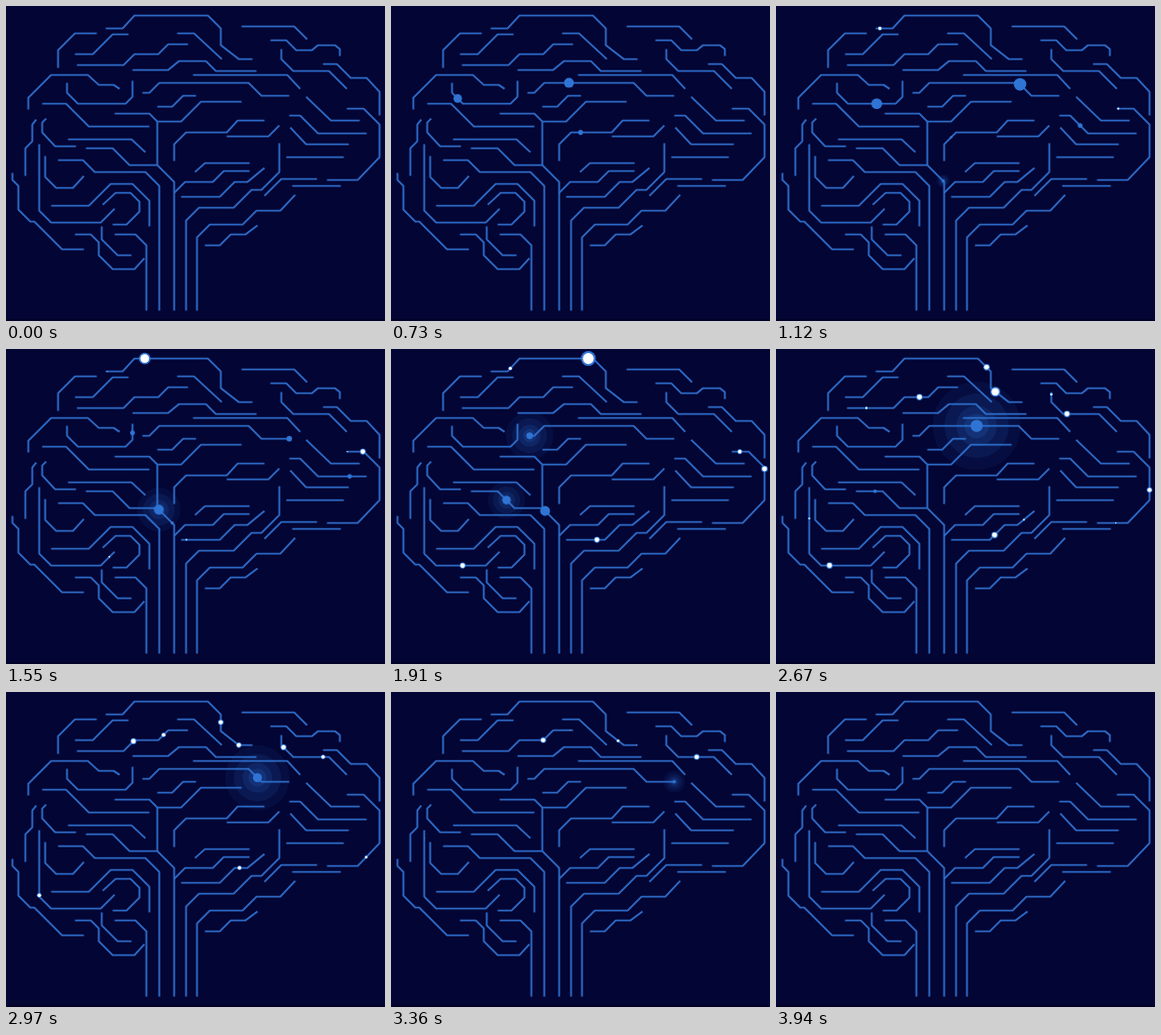
Write an HTML page that moves like this. It is 382 by 318 pixels and loops after 4 s.

```html
<!DOCTYPE html>
<html lang="en">
<head>
<meta charset="utf-8">
<title>Circuit brain</title>
<style>
html, body { margin: 0; width: 100%; height: 100%; overflow: hidden; background: #030534; }
svg { display: block; }
path { fill: none; stroke: #2d69c4; stroke-width: 1.9; stroke-linejoin: round; }
</style>
</head>
<body>
<svg width="382" height="318" viewBox="0 0 382 318">
<rect width="382" height="318" fill="#030534"/>
<rect y="316" width="382" height="2" fill="#010226"/>
<g id="stage" transform="translate(.5 .6)">

<!-- crown -->
<path d="M52 62V44L69 27H91"/>
<path id="crown" d="M100 22H117L129 9H203L216 22V39L234 53H248"/>
<path d="M69 48H87L107 28H123"/>
<path d="M172 27H189L217 53"/>
<path id="brow" d="M71 59H118L129 48H153L163 38H183"/>
<path d="M127 64H163L174 55H201L211 65H252"/>
<path d="M237 20H290L303 33"/>
<path d="M266 34H282L292 44H308L314 39H331L336 43V50"/>
<path id="hook" d="M277 43V53L289 65H325L343 83"/>
<path d="M319 58H333L347 72H363L376 86V110"/>

<!-- back -->
<path id="back" d="M343 103H360L376 119V152L354 175H323"/>
<path d="M302 91L327 115H356"/>
<path id="step" d="M285 110H296L314 128H363"/>
<path d="M286 122L302 139H345"/>
<path d="M282 152H340"/>
<path d="M260 191L277 174H313"/>
<path d="M288 181H337"/>

<!-- middle -->
<path d="M22 104V92L45 69H82L93 79H108L114 83"/>
<path id="cup" d="M61 77V87L72 98H120L127 91V75"/>
<path id="main" d="M137 87H144L154 77H244L257 90H285"/>
<path d="M188 69H283L296 83"/>
<path d="M36 98H60L83 121H144"/>
<path d="M152 101H167L178 90H191"/>
<path d="M109 108H144L152 116V160"/>
<path d="M152 116H176L196 96H237"/>
<path id="inner" d="M169 156V139L181 127H222L233 115H260"/>
<path d="M222 131H264L275 120"/>
<path d="M62 134H126L140 147"/>

<!-- front -->
<path d="M30 114L26 119V136L19 143V171"/>
<path d="M40 113L36 117V127L49 141H70"/>
<path d="M39 151V172L50 183H67L78 171"/>
<path id="front" d="M109 204L95 218H45L33 206V139"/>
<path d="M6 168V175L12 181V205L24 217H28L56 245H78"/>
<path d="M45 201H83L105 179H127L144 196V222"/>
<path d="M97 200L110 188H125L134 197V207L121 220H107"/>
<path d="M69 230H85L93 238V251L107 265H129L139 254"/>
<path d="M96 222V235L112 251H126"/>

<!-- stem -->
<path d="M109 230H130L141 241V307"/>
<path d="M52 155H77L89 167H140L154 181V307"/>
<path id="stem" d="M169 307V177L152 160H124L107 143H80"/>
<path d="M181 307V216L194 203H229L247 185H257L275 167V138"/>
<path d="M192 307V233L205 220H238L252 206H276L291 190"/>
<path d="M200 241H215L226 230H241L253 221"/>
<path d="M169 188L180 177H208L219 166H245"/>
<path d="M190 167L200 158H245"/>
<path id="leaf" d="M176 192H215L230 177H243L260 163"/>
</g>
</svg>
<script>
const LOOP = 4000, BEAT = 530, BLUE = '#2f74d4';
const stage = document.getElementById('stage');
const dots = [];

function circle(parent, r, fill, opacity = 1) {
  const el = document.createElementNS('http://www.w3.org/2000/svg', 'circle');
  for (const [key, value] of Object.entries({ r, fill, opacity })) el.setAttribute(key, value);
  parent.append(el);
}

// A dot runs along a path; stops are its distances on successive beats
function addDot(id, begin, stops, size, { white, halo } = {}) {
  const el = document.createElementNS('http://www.w3.org/2000/svg', 'g');
  stage.append(el);
  if (halo) [1, .73, .46, .28].forEach((s, i) => circle(el, halo * s, BLUE, .08 + i * .03));
  circle(el, white ? 1.36 : 1, BLUE);
  if (white) circle(el, 1, '#fff');
  dots.push({ el, path: document.getElementById(id), begin, stops, size });
}

// Two white sparks, the second one beat behind
function addSparks(id, begin, stops, size = 2.5) {
  addDot(id, begin, stops, size, { white: true });
  addDot(id, begin + BEAT, stops, 2.5, { white: true });
}

addDot('main', 320, [3, 64, 153, 157], 6.5);
addDot('main', 1550, [2, 8, 60, 147, 157], 6.5, { halo: 7.2 });
addDot('cup', 320, [0, 27, 80, 100], 5.6);
addDot('inner', 320, [85, 33, 28], 2.6);
addDot('step', 850, [4, 55, 85], 3.2);
addDot('stem', 950, [130, 146, 203, 233], 5, { halo: 4.5 });
addDot('stem', 1380, [130, 150, 191, 233], 5.4);

addSparks('crown', 850, [0, 21, 104, 135, 167, 181], 5.6);
addSparks('back', 850, [0, 8, 41, 92, 136]);
addSparks('front', 1380, [0, 43, 88, 154]);
addSparks('leaf', 1380, [0, 31, 65, 95]);
addSparks('brow', 1910, [0, 61, 94, 121]);
addSparks('hook', 1910, [0, 13, 57, 88]);

// Smooth curve through the stops, at rest at both ends
function along(stops, beat) {
  const i = Math.floor(beat), u = beat - i, v = 1 - u;
  const slope = j => j > 0 && j < stops.length - 1 ? (stops[j + 1] - stops[j - 1]) / 2 : 0;
  return stops[i] * (1 + 2 * u) * v * v + stops[i + 1] * (3 - 2 * u) * u * u
    + u * v * (slope(i) * v - slope(i + 1) * u);
}

// Grows from nothing, peaks a little early, shrinks to nothing
const swell = p => Math.sin(Math.PI * p ** .85) ** 1.5;

function draw(now) {
  const t = now % LOOP;
  for (const { el, path, begin, stops, size } of dots) {
    const beat = (t - begin) / BEAT, last = stops.length - 1;
    const live = beat >= 0 && beat < last;
    el.style.display = live ? '' : 'none';
    if (!live) continue;
    const { x, y } = path.getPointAtLength(along(stops, beat));
    el.setAttribute('transform', `translate(${x} ${y}) scale(${size * swell(beat / last)})`);
  }
  requestAnimationFrame(() => draw(performance.now() - start));
}
const start = performance.now();
draw(0);
</script>
</body>
</html>
```
